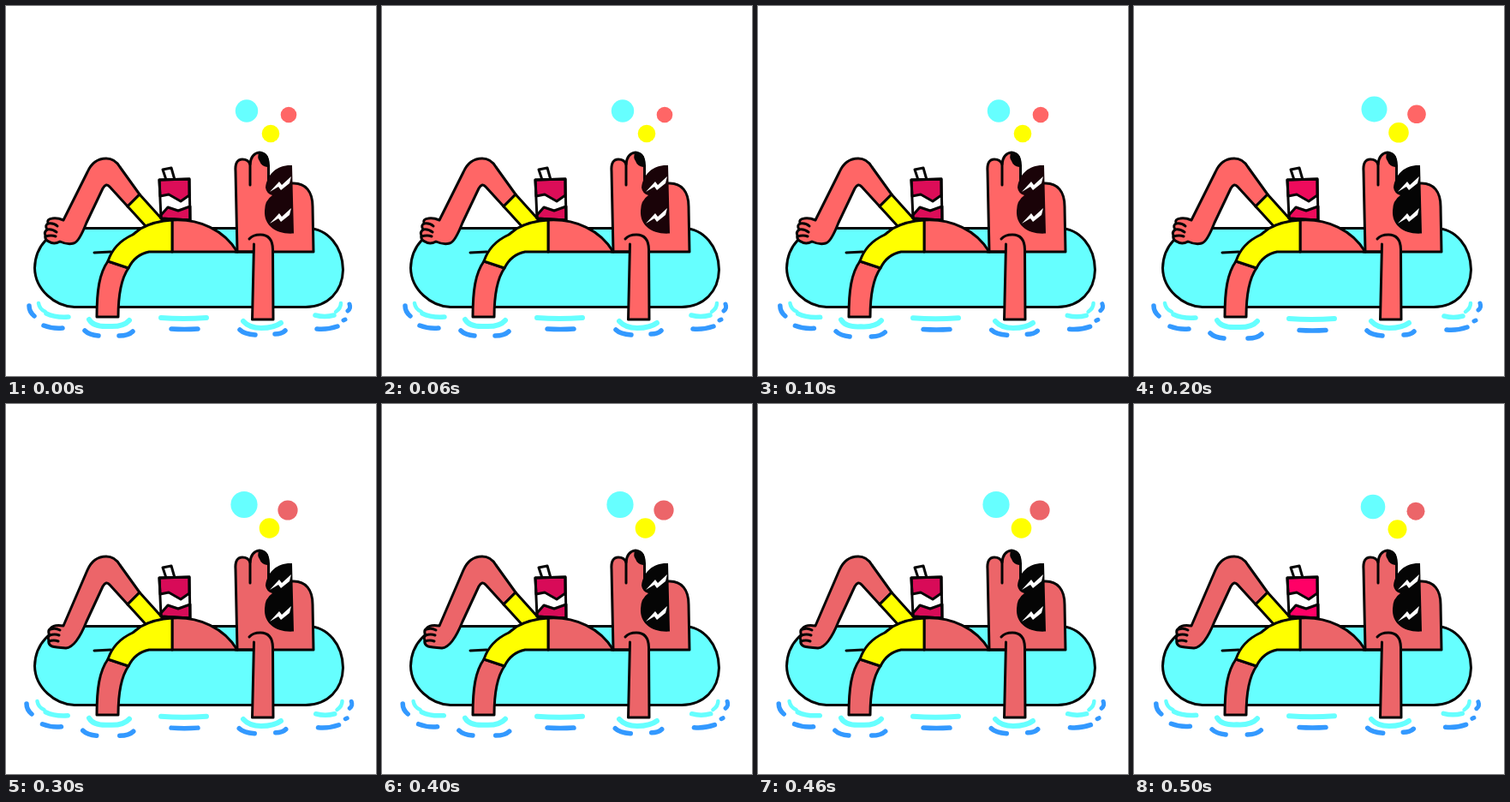
Animation, 432 px wide and 432 px high, one loop 0.6 s. Source, as an HTML page with a canvas:

```html
<!DOCTYPE html>
<html lang="en">
<head>
<meta charset="utf-8">
<title>Floating</title>
<style>
  html, body { margin: 0; width: 100%; height: 100%; overflow: hidden; background: #fff; }
  canvas { display: block; width: 432px; height: 432px; }
</style>
</head>
<body>
<canvas id="stage" width="432" height="432"></canvas>
<script>
const ctx = document.getElementById('stage').getContext('2d');
const STEP = 100;
const INK = '#050505', AQUA = '#66ffff', YELLOW = '#ffff00', BLUE = '#3399ff';
const RED = '#ff6666', DULL = '#ec6569', WINE = '#1a0308';

// Bubbles: [x, y, r] for aqua, red, yellow
const low = [[281, 122.5, 13.2], [330, 127, 9.3], [309, 149, 10.3]];
const mid = [[280.5, 120.5, 15], [330, 126.3, 10.8], [309, 147.8, 11.8]];
const high = [[278, 117.5, 15.6], [329, 124, 11.6], [307.5, 145, 11.8]];
const fall = [[279, 120, 14.3], [329, 125.2, 10.5], [307.5, 146.3, 11]];
const poses = [
  { spread: 0, bubbles: low, skin: RED, can: '#dc0d58', lens: WINE, up: true },
  { spread: 0.3, bubbles: low, skin: RED, can: '#dc0d58', lens: WINE, up: true },
  { spread: 1, bubbles: mid, skin: RED, can: '#ee0b5c', lens: INK, up: true },
  { spread: 0.75, bubbles: high, skin: DULL, can: '#d80b58', lens: INK, up: false },
  { spread: 0.7, bubbles: high, skin: DULL, can: '#d80b58', lens: INK, up: false },
  { spread: 0.3, bubbles: fall, skin: DULL, can: '#ff0066', lens: INK, up: false }
];

const thigh = 'L95 194Q102 178 117 178Q127 178 133 188L156 220L142 234Z';
const bolt = 'l11 -12l3 4l11 -10l-2 8l-10 8l-3 -4Z';
const shapes = {
  raft: 'M78 259.5H352C376 260 393 281 393.5 308C393 333 376 351 350 351.5H80C57 351 34 331 33.5 306C34 280 53 260 78 259.5Z',
  legUp: 'M142 234L121 211Q117 206 113 213L94 253Q85 276 79 277Q72 279 63 275Q56 279 50 275Q45 273 46 268Q44 264 48 261Q45 256 49 254Q47 249 54 248Q60 247 67 250' + thigh,
  legDown: 'M142 234L121 211Q117 206 113 213L94 254Q82 284 70 285Q57 284 54 283Q49 281 50 276Q48 272 51 270Q48 265 52 262Q56 257 67 259' + thigh,
  toesUp: 'M49 254Q56 253 60 257M48 261Q54 260 59 264M46 269Q53 267 58 269',
  toesDown: 'M52 263Q58 261 63 264M51 270Q57 268 62 270M50 277Q56 275 61 277',
  backShorts: 'M156 220L142 234L163 257L184 251Z',
  can: 'M179 203L214 202L215 250L181 248Z',
  canTop: 'M179 203L214 202V221L204 228L190 220L180 222Z',
  canBase: 'M181 244L189 235L201 239L215 234V250L181 248Z',
  straw: 'M187 203L183 191L193 189L197 203Z',
  belly: 'M194 250C226 248 255 262 270 287H194Z',
  shin: 'M119 298C109 312 106 332 106 363H131C131 337 134 319 143 306Z',
  shorts: 'M194 250V287H167Q151 290 143 306L119 298Q126 277 148 267L157 260Q173 251 194 250Z',
  head: 'M270 287L268 193Q267 179 276 179Q283 179 285 185Q286 172 296 171Q306 172 306.5 186V207H336C350 207 358 217 358 234L359 287Z',
  arm: 'M290 276L287 366H312L311.5 284Q311 267 297 267Q288 267 284 272Z',
  armLine: 'M284 272Q288 267 297 267Q311 267 311.5 284L312 366H287.5L289.5 278',
  mouth: 'M285 184V209',
  nose: 'M295 172Q302 169 306 176Q308 184 305 188Q298 187 296 181Q293 177 295 172Z',
  glasses: 'M334 186L336 265.5C315 267 301 256 302 239Q302 227 311 221Q304 219 303 212C305 195 318 185 334 186Z',
  bolts: 'M308 217' + bolt + 'M308 254' + bolt
};
for (const key in shapes) shapes[key] = new Path2D(shapes[key]);

// Ripples: colour, width, push direction (x, y), path
const ripples = [
  [BLUE, 5.5, -4, 0, 'M27 350Q27 357 33 362'],
  [AQUA, 4.5, -2, 0, 'M38 347Q39 354 46 357'],
  [AQUA, 5.5, -1, 1, 'M47 359Q57 364 73 363'],
  [BLUE, 5.5, -2, 1, 'M44 373Q54 377 66 376'],
  [AQUA, 6, 0, 1, 'M97 366Q102 375 120 374Q137 375 144 367'],
  [BLUE, 5.5, -3, 3, 'M92 379Q97 384 108 385'],
  [BLUE, 5.5, 1, 3, 'M132 385Q143 385 148 380'],
  [AQUA, 6, 0, 1, 'M181 364Q207 366 234 364'],
  [BLUE, 5.5, 0, 1.5, 'M193 377Q208 378 224 377'],
  [AQUA, 6, 0, 0, 'M277 368Q284 376 298 376Q313 376 321 370'],
  [BLUE, 5.5, -1, 1, 'M273 378Q278 383 291 384'],
  [BLUE, 5.5, 1, 1, 'M314 383Q322 383 326 379'],
  [AQUA, 5.5, 1, 1, 'M361 361Q372 364 383 361'],
  [AQUA, 4.5, 2, 0, 'M385 357Q391 353 391 347'],
  [BLUE, 5.5, 2, 1, 'M363 377Q376 378 387 374'],
  [BLUE, 5, 3, 1, 'M394 367L396 366'],
  [BLUE, 5, 3, -1, 'M401 348Q403 353 399 356']
].map(([color, width, dx, dy, d]) => ({ color, width, dx, dy, path: new Path2D(d) }));

function fill(name, color) {
  ctx.fillStyle = color;
  ctx.fill(shapes[name]);
}

function stroke(path) {
  ctx.strokeStyle = INK;
  ctx.lineWidth = 3;
  ctx.stroke(path);
}

function line(name) {
  stroke(shapes[name]);
}

function shape(name, color) {
  fill(name, color);
  line(name);
}

function segment(x1, y1, x2, y2) {
  const path = new Path2D();
  path.moveTo(x1, y1);
  path.lineTo(x2, y2);
  stroke(path);
}

function drawWater(spread) {
  for (const r of ripples) {
    ctx.save();
    ctx.translate(r.dx * spread, r.dy * spread);
    ctx.strokeStyle = r.color;
    ctx.lineWidth = r.width;
    ctx.stroke(r.path);
    ctx.restore();
  }
}

function drawCan(color) {
  shape('straw', '#fff');
  fill('can', '#fff');
  shape('canTop', color);
  shape('canBase', color);
  line('can');
}

function drawBubbles(bubbles, skin) {
  const colors = [AQUA, skin, YELLOW];
  bubbles.forEach(([x, y, r], i) => {
    ctx.fillStyle = colors[i];
    ctx.beginPath();
    ctx.arc(x, y, r, 0, Math.PI * 2);
    ctx.fill();
  });
}

function drawBody({ skin, can, lens, up }) {
  shape('raft', AQUA);
  segment(103, 288, 122, 287);
  shape(up ? 'legUp' : 'legDown', skin);
  line(up ? 'toesUp' : 'toesDown');
  shape('backShorts', YELLOW);
  drawCan(can);
  shape('belly', skin);
  shape('shin', skin);
  shape('shorts', YELLOW);
  shape('head', skin);
  segment(268, 287, 288, 287);
  fill('arm', skin);
  line('armLine');
  line('mouth');
  fill('nose', INK);
  fill('glasses', lens);
  fill('bolts', '#fff');
}

function draw(time) {
  const pose = poses[Math.floor(time / STEP) % poses.length];
  ctx.fillStyle = '#fff';
  ctx.fillRect(0, 0, 432, 432);
  ctx.lineCap = ctx.lineJoin = 'round';
  drawWater(pose.spread);
  drawBody(pose);
  drawBubbles(pose.bubbles, pose.skin);
}

let start;
function tick(now) {
  start ??= now;
  draw(now - start);
  requestAnimationFrame(tick);
}
requestAnimationFrame(tick);
</script>
</body>
</html>
```
